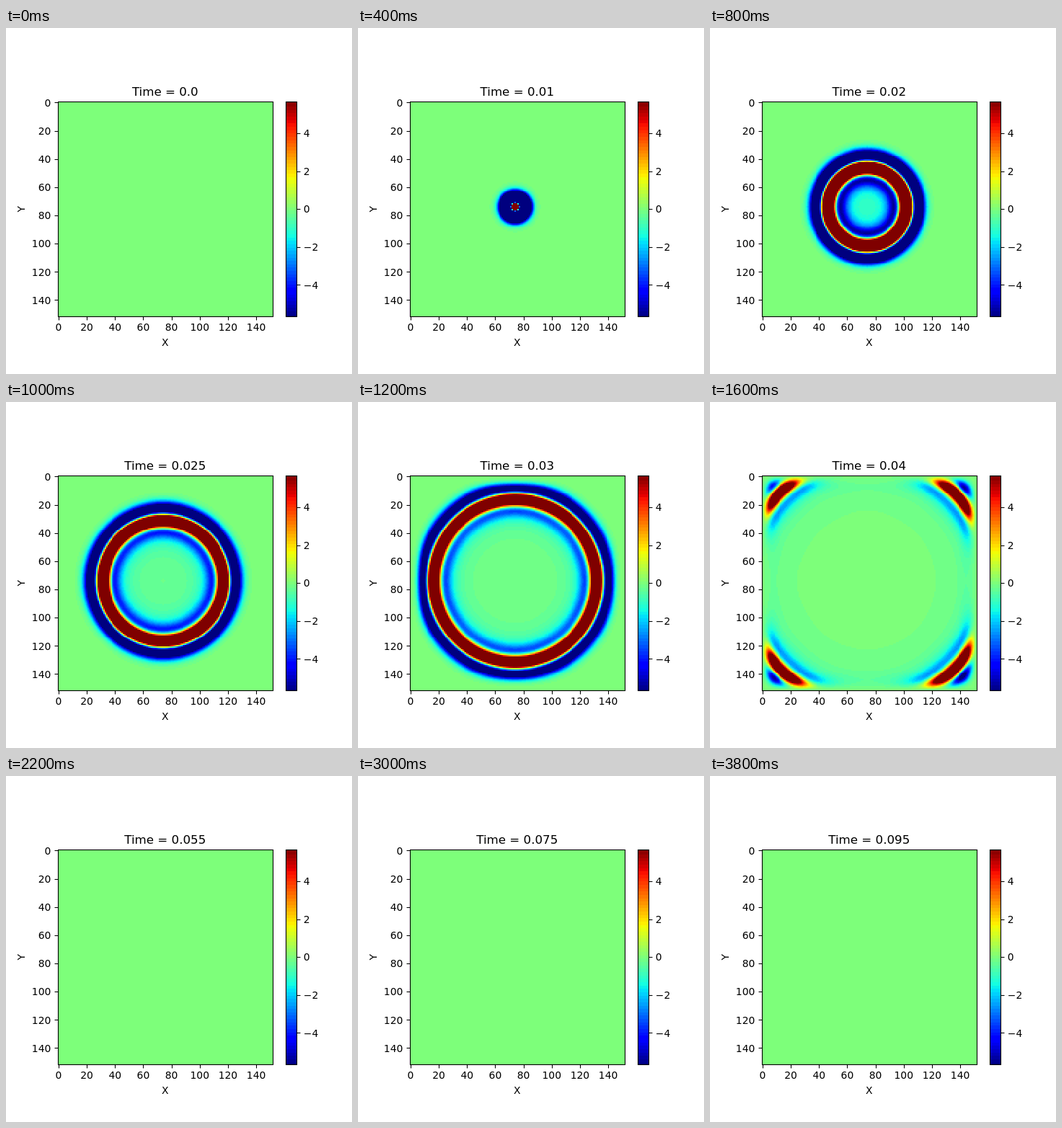
An HTML page with a canvas for the animation above (4000 ms loop, 480 px wide and 480 px high).

```html
<!DOCTYPE html>
<html lang="en">
<head>
<meta charset="utf-8">
<title>Wave field</title>
<style>
  html, body { margin: 0; width: 100%; height: 100%; overflow: hidden; background: #fff; }
  canvas { position: absolute; left: 72px; top: 102px; width: 298px; height: 298px; image-rendering: pixelated; }
  svg { position: absolute; left: 0; top: 0; }
  text { font: 13.89px "DejaVu Sans", sans-serif; }
  #title { font-size: 16.67px; }
</style>
</head>
<body>
<canvas id="field" width="152" height="152"></canvas>
<svg id="chart" width="480" height="480" viewBox="0 0 480 480"></svg>
<script>
const N = 152, FRAMES = 20, HOLD = 200, LIMIT = 5.655;
const LEFT = 72, TOP = 102.4, SIZE = 297.6, BOTTOM = TOP + SIZE;
const svg = document.getElementById('chart');
const ctx = document.getElementById('field').getContext('2d');

function add(tag, attrs, text) {
  const el = document.createElementNS('http://www.w3.org/2000/svg', tag);
  for (const key in attrs) el.setAttribute(key, attrs[key]);
  if (text !== undefined) el.textContent = text;
  return svg.appendChild(el);
}

// Jet colour map, rounded to bands of four entries around zero.
function ramp(x, stops) {
  for (let i = 1; i < stops.length; i++) {
    const [x0, y0] = stops[i - 1], [x1, y1] = stops[i];
    if (x <= x1) return y0 + (y1 - y0) * (x - x0) / (x1 - x0);
  }
}
function jet(value) {
  const band = 128 + 4 * Math.round(value / LIMIT * 32);
  const x = Math.max(0, Math.min(255, band)) / 255;
  return [
    ramp(x, [[0, 0], [.35, 0], [.66, 1], [.89, 1], [1, .5]]),
    ramp(x, [[0, 0], [.125, 0], [.375, 1], [.64, 1], [.91, 0], [1, 0]]),
    ramp(x, [[0, .5], [.11, 1], [.34, 1], [.65, 0], [1, 0]])
  ].map(v => Math.floor(v * 255.99));
}

// Acoustic wave from a point pulse, with absorbing layers along the walls.
function simulate() {
  const speed = 3000, dt = 2e-4, steps = 25, courant = speed * dt;
  const freq = 150, delay = .01, gain = 5.6e5, source = 74 * N + 74;
  const layer = 12, peakLoss = 1.5 * speed * Math.log(1000) / layer;
  const px = new Float32Array(N * N), py = px.slice(), p = px.slice(), vx = px.slice(), vy = px.slice();

  const losses = shift => Float32Array.from({ length: N }, (_, i) => {
    const x = i + shift, depth = Math.max(0, layer - x, x - (N - 1 - layer)) / layer;
    return Math.exp(-peakLoss * depth * depth * dt);
  });
  const keep = losses(0), keepHalf = losses(.5);
  const gains = list => list.map(k => courant * (1 + k) / 2);
  const push = gains(keep), pushHalf = gains(keepHalf);

  function step(t) {
    for (let j = 0; j < N - 1; j++) {
      for (let i = 0; i < N - 1; i++) {
        const k = j * N + i;
        vx[k] = keepHalf[i] * vx[k] - pushHalf[i] * (p[k + 1] - p[k]);
        vy[k] = keepHalf[j] * vy[k] - pushHalf[j] * (p[k + N] - p[k]);
      }
    }
    const tau = t - delay, pulse = gain * tau * Math.exp(-((Math.PI * freq * tau) ** 2));
    px[source] += pulse / 2;
    py[source] += pulse / 2;
    for (let j = 1; j < N - 1; j++) {
      for (let i = 1; i < N - 1; i++) {
        const k = j * N + i;
        px[k] = keep[i] * px[k] - push[i] * (vx[k] - vx[k - 1]);
        py[k] = keep[j] * py[k] - push[j] * (vy[k] - vy[k - N]);
        p[k] = px[k] + py[k];
      }
    }
  }

  const images = [];
  for (let n = 0; n < FRAMES; n++) {
    const image = ctx.createImageData(N, N);
    p.forEach((v, k) => image.data.set([...jet(v), 255], k * 4));
    images.push(image);
    for (let s = 0; s < steps; s++) step((n * steps + s + .5) * dt);
  }
  return images;
}

const snap = v => Math.floor(v + .5) + .5;
const line = (x1, y1, x2, y2) => add('line', { x1, y1, x2, y2, stroke: '#000', 'stroke-width': 1.1 });
const frame = (x, y, width, height) =>
  add('rect', { x, y, width, height, fill: 'none', stroke: '#000', 'stroke-width': 1.1 });
const label = (x, y, anchor, text) => add('text', { x, y, 'text-anchor': anchor }, text);

function drawChart() {
  for (let y = 0; y < 298; y++) {
    const fill = `rgb(${jet(LIMIT * (1 - 2 * (y + .5) / 298))})`;
    add('rect', { x: 388, y: 102 + y, width: 16, height: 1, fill, 'shape-rendering': 'crispEdges' });
  }
  frame(72.5, 102.5, 298, 298);
  frame(388.5, 102.5, 15, 298);
  for (let v = 0; v <= 140; v += 20) {
    const offset = (v + .5) * SIZE / N, x = LEFT + offset, y = TOP + offset;
    line(snap(x), 401, snap(x), 405.5);
    label(x, 420.2, 'middle', v);
    line(67.5, snap(y), 72, snap(y));
    label(62.3, y + 5.2, 'end', v);
  }
  for (let v = -4; v <= 4; v += 2) {
    const y = TOP + SIZE / 2 * (1 - v / LIMIT);
    line(404, snap(y), 408.5, snap(y));
    label(412.8, y + 5.2, 'start', String(v).replace('-', '\u2212'));
  }
  label(220.8, 440.5, 'middle', 'X');
  add('text', { transform: 'translate(26 251.2) rotate(-90)', 'text-anchor': 'middle' }, 'Y');
}

drawChart();
const title = add('text', { id: 'title', x: 220.8, y: 94, 'text-anchor': 'middle' });
const images = simulate();
let shown = -1;

function render(now) {
  const n = Math.floor(now / HOLD) % FRAMES;
  if (n !== shown) {
    shown = n;
    title.textContent = 'Time = ' + (n ? n * 5 / 1000 : '0.0');
    ctx.putImageData(images[n], 0, 0);
  }
  requestAnimationFrame(() => render(performance.now()));
}
render(performance.now());
</script>
</body>
</html>
```
